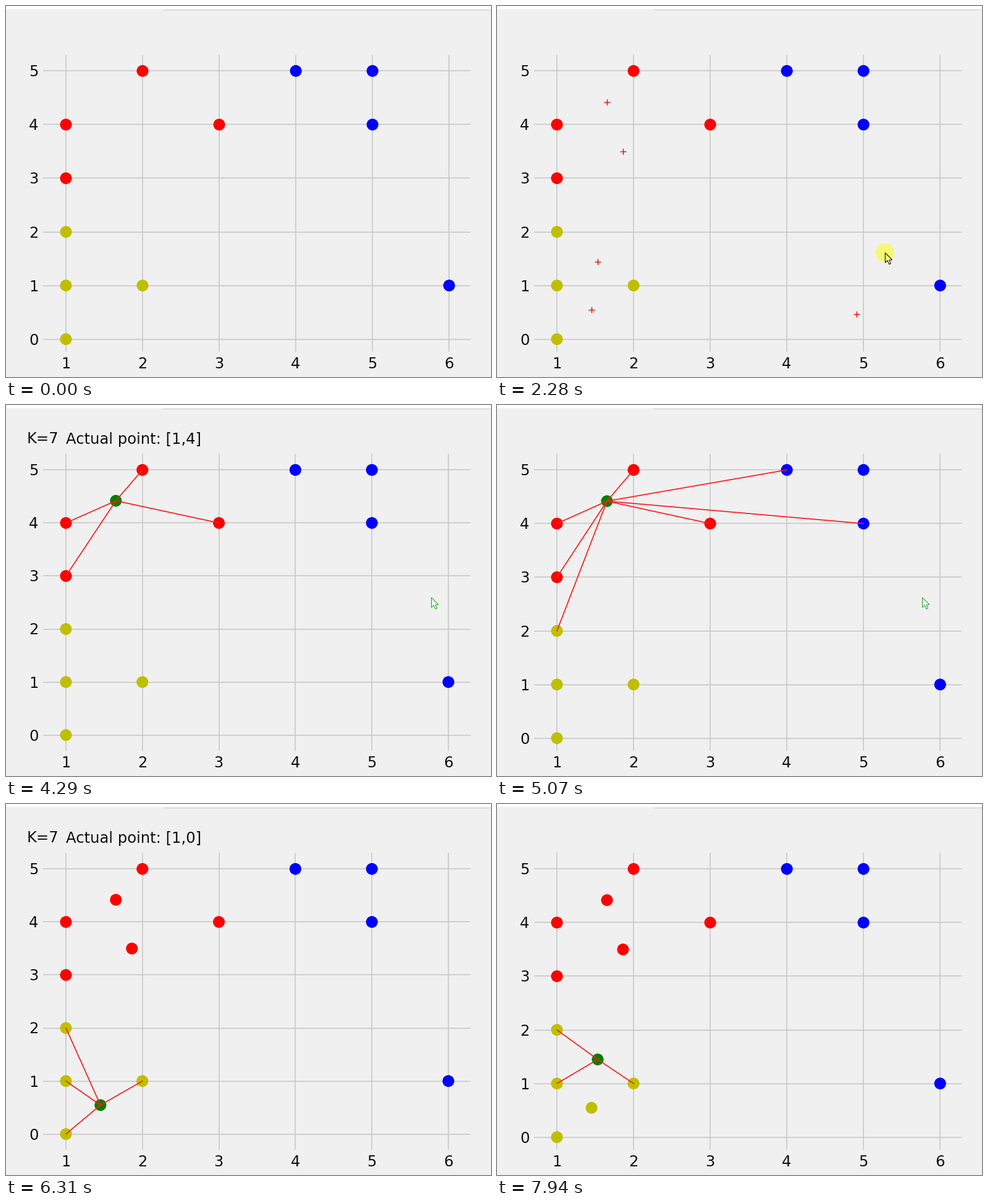
Write a matplotlib script that moves like this. It is 785 px wide and 602 px high and loops after 8 s.

```python
import numpy as np
import matplotlib.pyplot as plt
from matplotlib.animation import FuncAnimation
from matplotlib.patches import Circle, Polygon, Rectangle

W, H, DPI = 785, 602, 125
FRAMES, INTERVAL = 200, 40
TICK = 76.9                      # ms per screen refresh
K = 7
FIRST, PERIOD = 55, 13           # refresh of the first query, refreshes per query
TITLED = 8                       # leading refreshes of a query with the caption

CLASSES = {
    "r": [(1, 3), (1, 4), (2, 5), (3, 4)],
    "y": [(1, 0), (1, 1), (1, 2), (2, 1)],
    "b": [(4, 5), (5, 5), (5, 4), (6, 1)],
}

# Cursor stops: refresh of arrival, x, y in pixels
CLICKS = [(8, 178, 156), (10, 204, 236), (17, 153, 493), (20, 163, 414.5),
          (27, 581.5, 499.5), (33, 713, 217), (38, 408, 293.5), (42, 336.5, 371)]
STOPS = [(0, 546, 484), *CLICKS, (52, 536, 159), (FIRST, 688, 312)]
ARROW = np.array([(0, 0), (0, 16), (3.7, 12.5), (6.5, 18.5), (9, 17.4),
                  (6.4, 11.6), (11.4, 11.4)])


def scales(titled):
    """x of 1, pixels per unit of x, y of 0, pixels per unit of y."""
    return (97, 123.8, 535.6, 86.05) if titled else (97, 124.05, 540.6, 87.05)


def to_px(points, titled=False):
    x1, sx, y0, sy = scales(titled)
    x, y = np.asarray(points, float).T
    return np.column_stack([x1 + sx * (x - 1), y0 - sy * y])


def to_data(px, py):
    x1, sx, y0, sy = scales(False)
    return 1 + (px - x1) / sx, (y0 - py) / sy


def classify():
    """Nearest neighbours and winning class of each clicked point in turn."""
    known = [(p, c) for c, pts in CLASSES.items() for p in pts]
    result = []
    for _, px, py in CLICKS[:4]:
        q = to_data(px, py)
        near = sorted(known, key=lambda n: np.hypot(n[0][0] - q[0], n[0][1] - q[1]))[:K]
        votes = [c for _, c in near]
        label = max(CLASSES, key=votes.count)
        known.append((q, label))
        result.append((q, [p for p, _ in near], label))
    return result


QUERIES = classify()

fig = plt.figure(figsize=(W / DPI, H / DPI), dpi=DPI, facecolor="#f0f0f0")
ax = fig.add_axes([0, 0, 1, 1])
ax.set(xlim=(0, W), ylim=(H, 0))
ax.axis("off")

ax.add_patch(Rectangle((0, 0), W, 5, color="white", lw=0))
ax.plot([254, W], [5.5, 5.5], color="#cfcfcf", lw=0.58)


def label(x, y, s):
    return ax.text(x, y, s, fontsize=14, family="DejaVu Sans", color="#101010",
                   ha="left", va="baseline")


def line(color, **kw):
    return ax.plot([], [], color=color, **kw)[0]


grid_x = [line("#cbcbcb", lw=1, zorder=1) for _ in range(6)]
grid_y = [line("#cbcbcb", lw=1, zorder=1) for _ in range(6)]
text_x = [label(0, 588, str(i + 1)) for i in range(6)]
text_y = [label(37, 0, str(i)) for i in range(6)]
caption = [label(34, 62.5, f"K={K}"), label(97, 62.5, "")]

dots = ax.scatter([], [], s=11 ** 2, lw=0, zorder=2)
links = [line("#ff1c1c", lw=1, zorder=4) for _ in range(K)]
pluses = line("r", ls="", marker="+", ms=6, mew=0.8, zorder=4)

arrow_fill = ax.add_patch(Polygon(ARROW, fc="white", lw=0, zorder=5))
halo = ax.add_patch(Circle((0, 0), 15, fc="#ffff00", alpha=0.5, lw=0, zorder=6))
arrow_edge = ax.add_patch(Polygon(ARROW, fc="none", lw=0.6, zorder=7))


def draw_grid(titled):
    for i, (x, y) in enumerate(to_px([(i + 1, i) for i in range(6)], titled)):
        grid_x[i].set_data([x, x], [80, 560])
        grid_y[i].set_data([60.5, 751], [y, y])
        text_x[i].set_x(x - 8)
        text_y[i].set_y(y + 9)


def draw_dots(n, titled):
    marks = [(p, c) for c, pts in CLASSES.items() for p in pts]
    marks += [(q, c) for q, _, c in QUERIES[:max(n, 0)]]
    if n >= 0:
        marks.append((QUERIES[n][0], "g"))
    dots.set_offsets(to_px([p for p, _ in marks], titled))
    dots.set_facecolor([c for _, c in marks])


def draw_query(n, phase, titled):
    for t in caption:
        t.set_visible(titled)
    count = 0
    if n >= 0:
        q, near, _ = QUERIES[n]
        caption[1].set_text(f"Actual point: [{int(q[0])},{int(q[1])}]")
        # two passes under the caption, a last one without it
        count = 2 + 2 * (phase % 4) if titled else 1 + 2 * (phase - TITLED)
    for i, ln in enumerate(links):
        ln.set_data(to_px([q, near[i]], titled).T if i < count else ([], []))


def cursor_at(k):
    """Rest one refresh at every stop, then ease to the next."""
    for (k0, *a), (k1, *b) in zip(STOPS, STOPS[1:]):
        if k <= k1:
            u = np.clip((k - k0 - 1) / (k1 - k0 - 1), 0, 1)
            return np.array(a) + (np.array(b) - a) * u * u * (3 - 2 * u)
    return np.array(STOPS[-1][1:])


def draw_cursor(k):
    shown = 1 <= k < FIRST + PERIOD
    pos = cursor_at(k)
    for a in (arrow_fill, arrow_edge):
        a.set_xy(ARROW + pos + 0.5)
        a.set_visible(shown)
    halo.center = pos
    halo.set_visible(shown and k < FIRST)
    arrow_edge.set_edgecolor("black" if k < FIRST else "#20a020")
    marks = [(x, y) for at, x, y in CLICKS if at < k < FIRST]
    pluses.set_data([x for x, _ in marks], [y for _, y in marks])


def update(frame):
    k = int(((frame + 0.5) * INTERVAL + 30) / TICK)
    n, phase = divmod(k - FIRST, PERIOD)
    n = min(max(n, -1), len(QUERIES) - 1)
    titled = n >= 0 and phase < TITLED
    draw_grid(titled)
    draw_dots(n, titled)
    draw_query(n, phase, titled)
    draw_cursor(k)
    return []


anim = FuncAnimation(fig, update, frames=FRAMES, interval=INTERVAL,
                     repeat=True, repeat_delay=0, blit=False)
plt.show()
```
